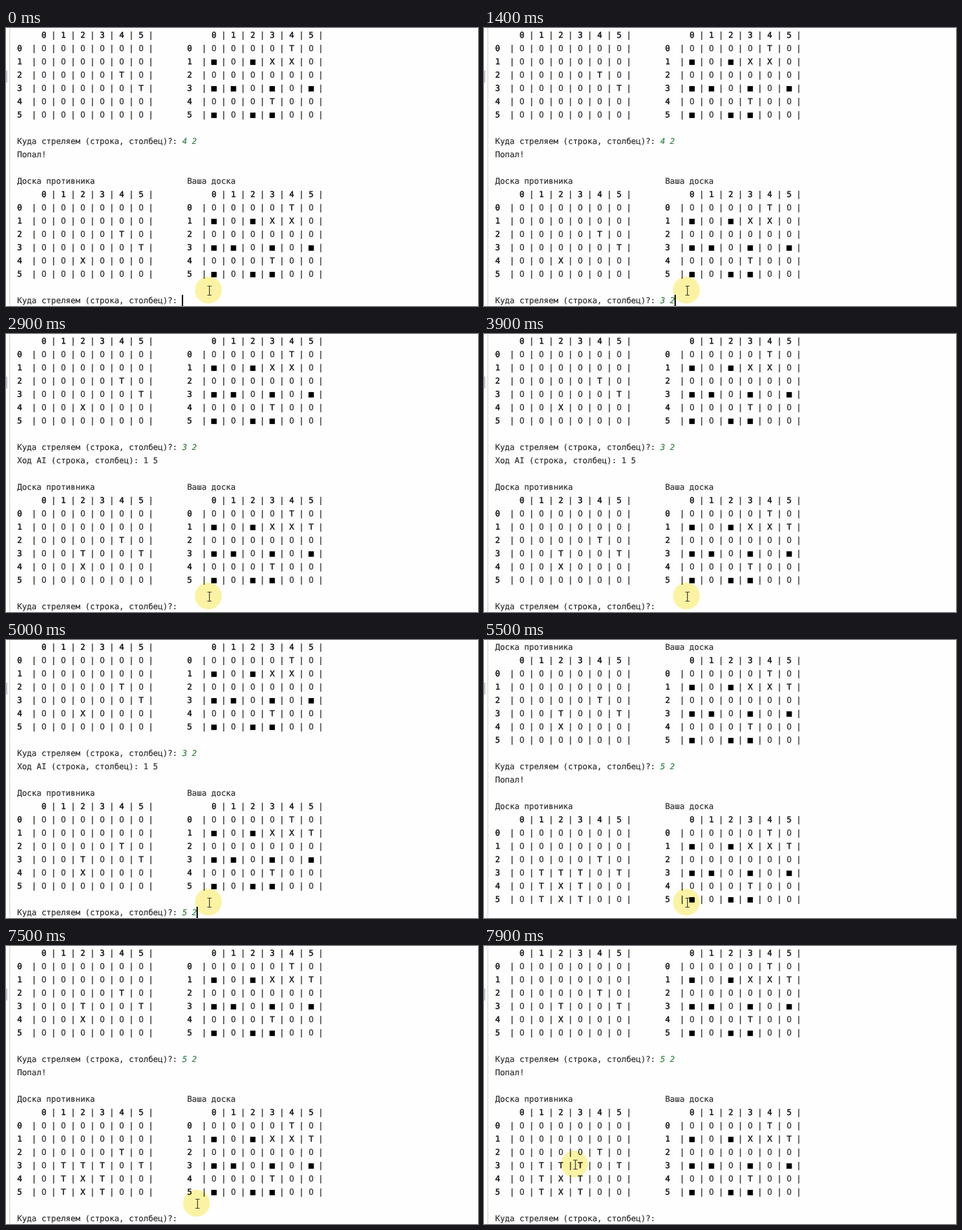
These frames come from a looping animation (674 by 398 pixels, 8000 ms). An HTML page:

```html
<!DOCTYPE html>
<html lang="ru">
<head>
<meta charset="utf-8">
<style>
  html, body { margin: 0; width: 100%; height: 100%; overflow: hidden; background: #fff; }
  #stage { position: relative; width: 674px; height: 398px; overflow: hidden; background: #fefefe; isolation: isolate; }
  #stage > * { position: absolute; }
  #edge { left: 5px; top: 0; width: 1px; height: 398px; background: #d0d0d0; }
  #thumb { left: 0; top: 61px; width: 2px; height: 17px; background: #c9c9c9; }
  #console {
    left: 16px; margin: 0; padding-top: 1px; color: #303030; white-space: pre;
    font: 11.53px/19px "DejaVu Sans Mono", monospace;
    text-rendering: geometricPrecision;
    -webkit-text-stroke: .2px;
  }
  #console b { font-weight: normal; color: #181818; -webkit-text-stroke: .45px; }
  #console u { text-decoration: none; color: #46463a; -webkit-text-stroke: .5px; }
  #console s { text-decoration: none; color: #000; -webkit-text-stroke: .8px; }
  #console i { color: #2f8040; }
  #caret { top: 382px; width: 2px; height: 16px; background: #111; }
  #pointer { width: 38px; height: 38px; overflow: visible; mix-blend-mode: multiply; }
</style>
</head>
<body>
<div id="stage">
  <div id="edge"></div>
  <div id="thumb"></div>
  <pre id="console"></pre>
  <div id="caret"></div>
  <svg id="pointer" viewBox="0 0 38 38">
    <circle cx="19" cy="18.2" r="19.2" fill="#fcf4a4"/>
    <path d="M17.5 12.5h6M20.5 12.5v13M17.5 25.5h6" fill="none" stroke="#444" stroke-width="1.2"/>
  </svg>
</div>
<script>
const LOOP = 8000, STEP = 100, LINE = 19, CHAR = 6.94, LEFT = 16, PROMPT_COLS = 34;
const el = id => document.getElementById(id);

const own = row1 => ['OOOOTO', row1, 'OOOOOO', '■■O■O■', 'OOOTOO', '■O■■OO'];
const enemy = (row3, row4, row5) => ['OOOOOO', 'OOOOOO', 'OOOOTO', row3, row4, row5];

const turns = [
  { foe: enemy('OOOOOT', 'OOOOOO', 'OOOOOO'), mine: own('■O■XXO'), reply: 'Попал!' },
  { foe: enemy('OOOOOT', 'OOXOOO', 'OOOOOO'), mine: own('■O■XXO'), reply: 'Ход AI (строка, столбец): 1 5' },
  { foe: enemy('OOTOOT', 'OOXOOO', 'OOOOOO'), mine: own('■O■XXT'), reply: 'Попал!' },
  { foe: enemy('OTTTOT', 'OTXTOO', 'OTXTOO'), mine: own('■O■XXT'), reply: '' },
];

const pair = (a, b) => a.padEnd(35) + b;
const boardRow = (cells, i) => `${i}  | ${[...cells].join(' | ')} |`;
const decorate = text => text.replace(/[0-5TX]/g, '<b>$&</b>')
  .replace(/\|/g, '<u>|</u>').replace(/■/g, '<s>■</s>');

function turnLines({ foe, mine, reply }) {
  const header = '     0 | 1 | 2 | 3 | 4 | 5 |';
  return [
    pair('Доска противника', 'Ваша доска'),
    decorate(pair(header, header)),
    ...foe.map((cells, i) => decorate(pair(boardRow(cells, i), boardRow(mine[i], i)))),
    '',
    'Куда стреляем (строка, столбец)?: <i></i>',
    reply,
    '',
  ];
}
el('console').innerHTML = turns.flatMap(turnLines).join('\n');
const inputs = document.querySelectorAll('#console i');

// Latest value in a list of [start time, value] pairs.
const at = (track, t) => track.filter(([start]) => start <= t).pop()[1];

const scroll = [[0, 1], [1900, 12], [2200, 13], [5500, 24], [5700, 25]];
const typing = [
  [[0, '4 2']],
  [[0, ''], [100, '3'], [300, '3 '], [400, '3 2']],
  [[0, ''], [4600, '5'], [4900, '5 '], [5000, '5 2']],
  [[0, '']],
];
const blink = [[0, 1], [900, 0], [1400, 1], [1900, 0], [2200, 1], [2900, 0], [3400, 1], [3900, 0],
  [4400, 1], [5500, 0], [5700, 1], [6400, 0], [7000, 1], [7500, 0]];

function draw(t) {
  el('console').style.top = -at(scroll, t) * LINE + 'px';

  inputs.forEach((input, i) => { input.textContent = at(typing[i], t); });
  const active = t < 1900 ? 1 : t < 5500 ? 2 : 3;
  const column = PROMPT_COLS + at(typing[active], t).length;
  el('caret').style.left = LEFT + column * CHAR - .8 + 'px';
  el('caret').style.opacity = at(blink, t);

  const p = Math.min(1, Math.max(0, (t - 7400) / 500));
  const ease = p * p * (3 - 2 * p);
  el('pointer').style.left = 270 - 160 * ease + 'px';
  el('pointer').style.top = 357 - 63 * ease + 'px';
}

const origin = performance.now();
function frame() {
  const t = (performance.now() - origin) % LOOP;
  draw(Math.floor(t / STEP) * STEP);
  requestAnimationFrame(frame);
}
frame();
</script>
</body>
</html>
```
